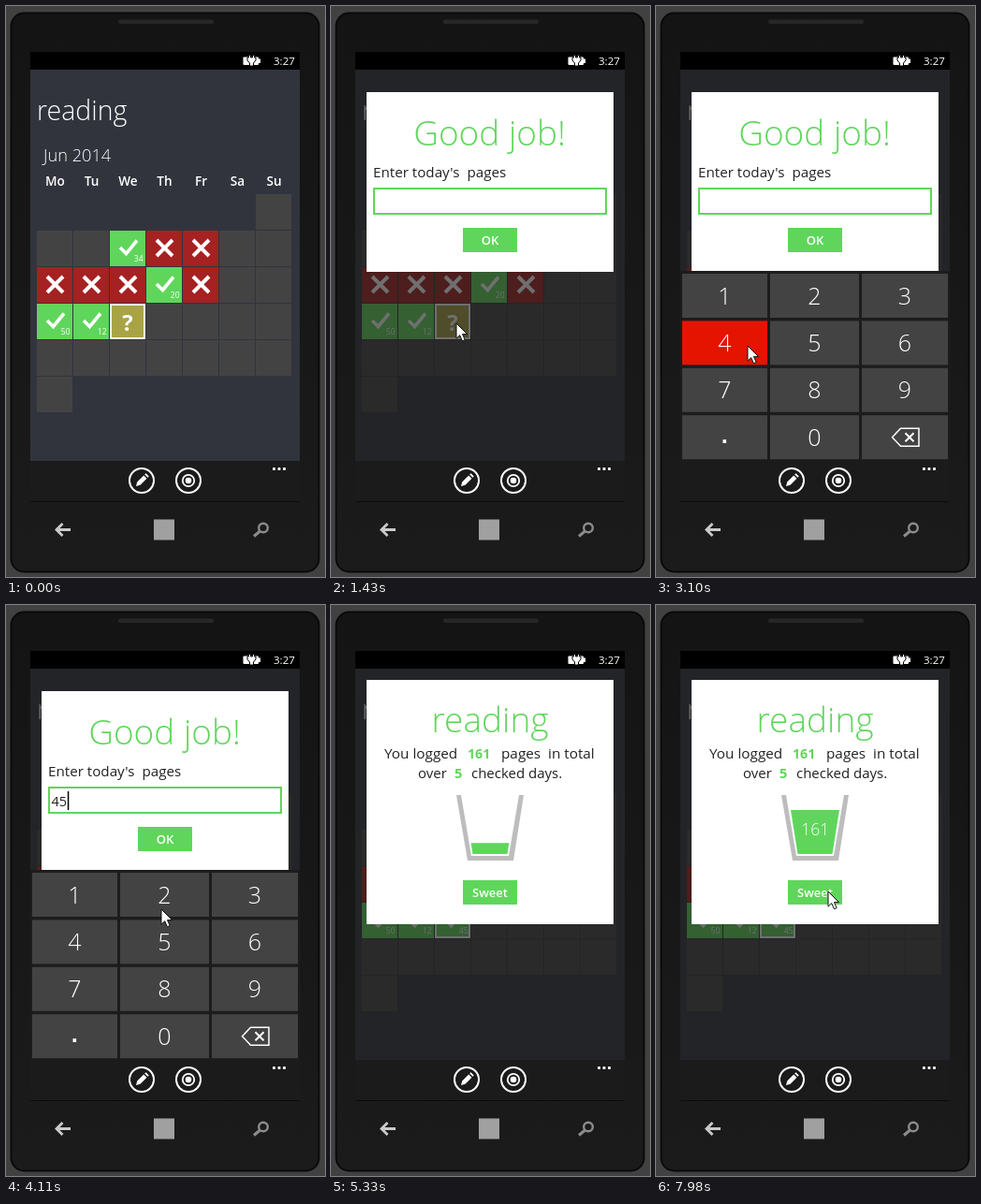
Animation, 341 px wide and 610 px high, one loop 8000 ms. Source, as an HTML page:

```html
<!DOCTYPE html>
<html lang="en">
<head>
<meta charset="utf-8">
<title>Reading log</title>
<style>
  html, body { margin: 0; width: 100%; height: 100%; overflow: hidden; background: #414141; }
  svg { display: block; width: 100vw; height: 100vh; }
  text { font-family: "Open Sans", "Noto Sans", sans-serif; fill: #fff; white-space: pre; }
  .light { font-weight: 300; }
  .semi { font-weight: 600; }
  .bold { font-weight: 700; }
  .mid { text-anchor: middle; }
  .end { text-anchor: end; }
  .green { fill: #5fd65b; }
  .dark { fill: #222; }
  .line { fill: none; stroke: #fff; }
</style>
</head>
<body>
<svg id="stage" viewBox="0 0 341 610"></svg>
<script>
const LOOP = 8000;
const GREEN = '#5fd65b', RED = '#a52122', GREY = '#434343';
const DIALOG_OPEN = 1430, SUMMARY_OPEN = 5060;

const rect = (x, y, w, h, fill, extra = '') =>
  `<rect x="${x}" y="${y}" width="${w}" height="${h}" fill="${fill}" ${extra}/>`;
const text = (x, y, size, cls, value, extra = '') =>
  `<text x="${x}" y="${y}" font-size="${size}" class="${cls}" ${extra}>${value}</text>`;
const line = (d, width, extra = '') =>
  `<path d="${d}" class="line" stroke-width="${width}" ${extra}/>`;
const group = (id, content, extra = '') => `<g id="${id}" ${extra}>${content}</g>`;

function phone() {
  return rect(0, 0, 341, 610, '#414141') +
    rect(5.5, 7.5, 329, 597, 'url(#body)', 'rx="14" stroke="#0a0a0a" stroke-width="2"') +
    rect(120, 14.5, 102, 4.5, '#272727', 'rx="2"') +
    rect(26, 49, 288, 19, '#000') +
    rect(26, 68, 288, 418, '#31343d');
}

function statusBar() {
  return rect(253.5, 54.5, 16.5, 8.5, '#fff', 'rx="1"') +
    rect(270, 56.5, 2, 4.5, '#fff') +
    '<path d="M258 55h1.5v-2.5h2V55h2v-2.5h2V55h1.5v3l-2.5 3v3h-4v-3l-2.5-3z" fill="#fff" stroke="#000"/>' +
    text(286, 62.5, 11.5, '', '3:27');
}

function check(x, y, pages) {
  return rect(x, y, 38, 38, GREEN) +
    line(`M${x + 11} ${y + 18}l6.5 6.5 11.5-14`, 3.6) +
    text(x + 35.5, y + 32.5, 8.5, 'end', pages);
}

function cross(x, y) {
  return rect(x, y, 38, 38, RED) +
    line(`M${x + 11} ${y + 10}l17 17m0-17l-17 17`, 4);
}

// Each row: "." is hidden, "-" empty, "x" missed, a number is the logged pages.
function calendar() {
  const rows = ['. . . . . . -', '- - 34 x x - -', 'x x x 20 x - -',
    '50 12 - - - - -', '- - - - - - -', '- . . . . . .'];
  let out = text(33, 121.5, 28.5, 'light', 'reading') + text(40, 166, 18.2, 'light', 'Jun 2014');
  ['Mo', 'Tu', 'We', 'Th', 'Fr', 'Sa', 'Su'].forEach((day, i) => {
    out += text(52.5 + 39 * i, 192, 13.6, 'semi mid', day);
  });
  rows.forEach((row, r) => row.split(' ').forEach((mark, c) => {
    const x = 33 + 39 * c, y = 201 + 39 * r;
    if (mark === '-') out += rect(x, y, 38, 38, GREY);
    else if (mark === 'x') out += cross(x, y);
    else if (mark !== '.') out += check(x, y, mark);
  }));
  return out +
    group('pending', rect(111, 318, 38, 38, '#a8a445') + text(130, 346.5, 24, 'bold mid', '?')) +
    group('logged', check(111, 318, 45)) +
    rect(112, 319, 36, 36, 'none', 'stroke="#fff" stroke-width="2"');
}

function button(y, label) {
  return rect(141, y, 58, 26, GREEN) + text(170, y + 17.8, 13, 'semi mid', label);
}

function entryDialog() {
  return rect(38, 92, 264, 192, '#fff') +
    text(169.5, 148.5, 37, 'light mid green', 'Good job!') +
    text(45, 183, 15.2, 'dark', "Enter today's  pages") +
    rect(46, 195, 248, 27, '#fff', `stroke="${GREEN}" stroke-width="2"`) +
    text(48.5, 215, 14.5, 'dark', '', 'id="entry"') +
    rect(0, 199, 1.5, 20, '#000', 'id="caret"') +
    button(237, 'OK');
}

function keyboard() {
  const columns = [[28, 91], [122, 95], [220, 92]];
  let out = rect(26, 283, 288, 204, '#1c1c1c');
  ['1', '2', '3', '4', '5', '6', '7', '8', '9', '.', '0', 'back'].forEach((key, i) => {
    const [x, w] = columns[i % 3], y = 286 + 50.4 * Math.floor(i / 3), mid = x + w / 2;
    out += rect(x, y, w, 47, GREY, `id="key${i + 1}"`);
    if (key === 'back') {
      out += line(`M252.5 ${y + 23.5}l9-9.5h19.5v19h-19.5z`, 1.5) +
        line(`M266.5 ${y + 19}l9 9m0-9l-9 9`, 2);
    } else if (key === '.') out += rect(mid - 2, y + 26, 3.6, 3.8, '#fff');
    else out += text(mid, y + 32.5, 25, 'light mid', key);
  });
  return `<g clip-path="url(#app)">${group('keyboard', out)}</g>`;
}

function summaryDialog() {
  return rect(38, 80, 264, 261, '#fff') +
    text(170, 136, 37, 'light mid green', 'reading') +
    text(57, 164, 15.3, 'dark', 'You logged') +
    text(146, 164, 14.2, 'bold green', '161') +
    text(182, 164, 15.3, 'dark', 'pages  in total') +
    text(93, 185, 15, 'dark', 'over') +
    text(132, 185, 14.5, 'bold green', '5') +
    text(150, 185, 15, 'dark', 'checked days.') +
    '<path d="M134 203h5l11 65h40l11-65h5l-11 70h-49z" fill="#bdbdbd"/>' +
    `<g clip-path="url(#level)"><path d="M144 219h52l-7.5 47h-37z" fill="${GREEN}"/>` +
    text(170.2, 246, 17.5, 'light mid', '161') + '</g>' +
    button(294, 'Sweet');
}

function appBar() {
  const ring = (x, r, w) => `<circle cx="${x}" cy="507" r="${r}" class="line" stroke-width="${w}"/>`;
  return rect(26, 486, 288, 43, '#1b1b1b') + rect(26, 529, 288, 1, '#0c0c0c') +
    ring(145, 13, 2) + ring(195, 13, 2) + ring(195, 6.2, 1.8) +
    '<circle cx="195" cy="507" r="3.3" fill="#fff"/>' +
    '<path d="M139 513l1.2-4.5 7-7 3.3 3.3-7 7zM148.2 500.5l1.3-1.3 3.3 3.3-1.3 1.3z" fill="#fff"/>' +
    [285, 290.5, 296].map(x => rect(x, 493, 3, 3, '#fff', 'rx="1"')).join('') +
    line('M69 559.5H54M60.5 553l-6.5 6.5 6.5 6.5', 2.8, 'style="stroke:#cacaca"') +
    rect(158, 548.5, 22, 22, '#a0a0a0') +
    '<g fill="none" stroke="#8c8c8c"><circle cx="275" cy="557.5" r="4.8" stroke-width="2.4"/>' +
    '<path d="M271.5 561l-6.5 5.5" stroke-width="3"/></g>';
}

const stage = document.getElementById('stage');
stage.innerHTML = `<defs>
    <linearGradient id="body" x2="0" y2="1">
      <stop stop-color="#141414"/><stop offset="1" stop-color="#1b1b1b"/>
    </linearGradient>
    <clipPath id="app">${rect(26, 68, 288, 418, '#000')}</clipPath>
    <clipPath id="level">${rect(140, 219, 60, 47, '#000', 'id="fill"')}</clipPath>
  </defs>` +
  phone() + statusBar() + calendar() +
  rect(26, 68, 288, 418, '#1c1c1c', 'id="shade" opacity="0.63"') +
  group('entryDialog', entryDialog() + keyboard()) +
  group('summaryDialog', summaryDialog()) + appBar() +
  group('cursor', '<path d="M0 0V16.2L3.7 12.7L6.4 18.8L9.2 17.6L6.5 11.6H11.6Z" fill="#fff" stroke="#111" stroke-width="1"/>');

const el = id => document.getElementById(id);
const show = (id, on) => el(id).setAttribute('display', on ? 'inline' : 'none');
const progress = (t, from, to) => Math.min(1, Math.max(0, (t - from) / (to - from)));

// [time, x, y]
const cursorPath = [
  [500, 308, 400], [1240, 134, 339], [1740, 134, 339], [2230, 151, 407],
  [2890, 98, 363], [3190, 98, 363], [3590, 171, 367], [3900, 171, 367],
  [4110, 166, 325], [4740, 165, 250], [5060, 165, 250],
  [6700, 333, 371], [7560, 229, 347], [7650, 229, 347], [7960, 184, 306], [8000, 184, 306]
];

function cursorAt(t) {
  const next = Math.max(1, cursorPath.findIndex(point => point[0] > t));
  const [t0, x0, y0] = cursorPath[next - 1], [t1, x1, y1] = cursorPath[next];
  const p = progress(t, t0, t1), ease = (1 - Math.cos(Math.PI * p)) / 2;
  return [x0 + (x1 - x0) * ease, y0 + (y1 - y0) * ease];
}

function render(t) {
  const entering = t >= DIALOG_OPEN && t < SUMMARY_OPEN, summary = t >= SUMMARY_OPEN;
  show('shade', t >= DIALOG_OPEN);
  show('entryDialog', entering);
  show('summaryDialog', summary);
  show('pending', !summary);
  show('logged', summary);

  const slide = 204 * (1 - progress(t, 1500, 1730)) ** 3;
  el('keyboard').setAttribute('transform', `translate(0 ${slide})`);
  el('key4').setAttribute('fill', t >= 3100 && t < 3190 ? '#e51400' : GREY);
  el('key5').setAttribute('fill', t >= 3600 && t < 3680 ? '#e51400' : GREY);

  const typed = t < 3190 ? '' : t < 3680 ? '4' : '45';
  const blinkStart = [1510, 3190, 3680][typed.length];
  el('entry').textContent = typed;
  el('caret').setAttribute('x', 49 + 8.4 * typed.length);
  show('caret', entering && t >= 1510 && Math.floor((t - blinkStart) / 530) % 2 === 0);

  const level = 47 * progress(t, 5095, 6030);
  el('fill').setAttribute('y', 266 - level);
  el('fill').setAttribute('height', level);

  show('cursor', (t >= 560 && t < SUMMARY_OPEN) || t >= 6770);
  el('cursor').setAttribute('transform', `translate(${cursorAt(t)})`);
}

function tick() {
  render(performance.now() % LOOP);
  requestAnimationFrame(tick);
}
tick();
</script>
</body>
</html>
```
